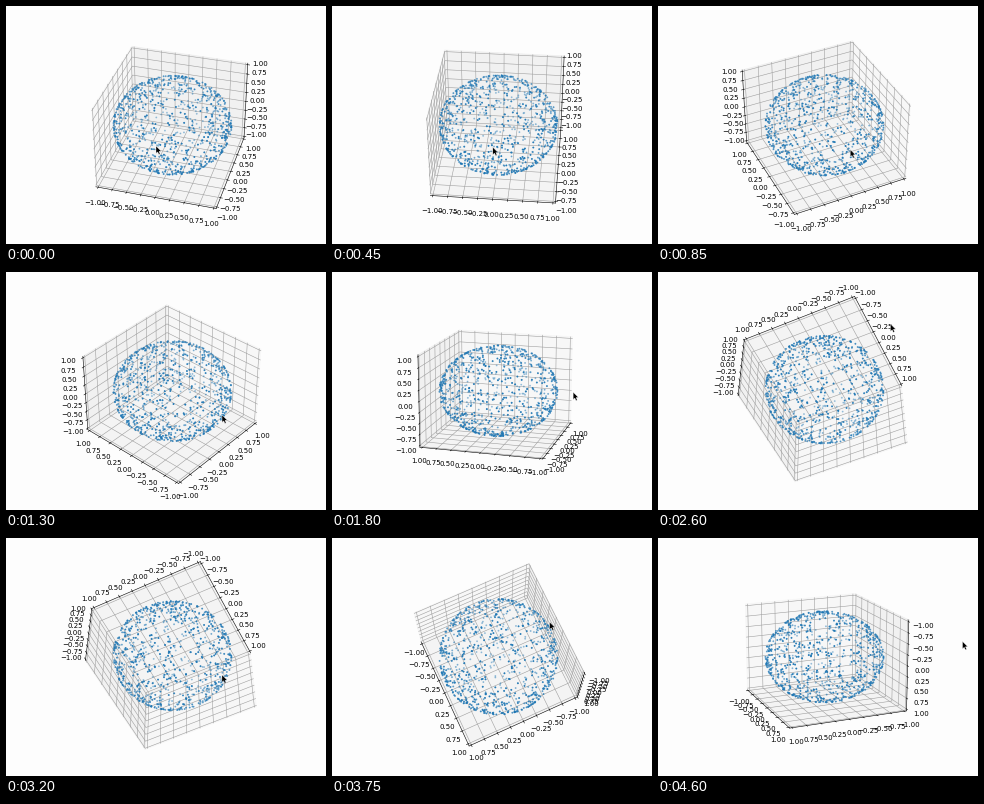
Animation of 320 by 238 pixels, one loop 4750 ms. Source, as a matplotlib script:

```python
import numpy as np
import matplotlib.pyplot as plt
from matplotlib.animation import FuncAnimation
from matplotlib.patches import Polygon

W, H, DPI = 320, 238, 50
FRAMES, STEP = 95, 50
POINTS = 900
MARGIN = 25 / 24            # panes reach a little past the data
PX_PER_DEG = 0.77 * H / 180  # dragging across the axes turns the view by 180 degrees
PRESS = 150, 140            # where the mouse is pressed, from the top left

# Two drags: time (ms), azimuth, elevation
VIEW = [(0, -74, 34.5), (550, -87, 36), (850, -115.5, 38), (1650, -157, 37),
        (1800, -163.5, 15), (2600, -155, -52), (2750, -153.5, -55),
        (3200, -153.5, -55), (4350, -157, -163.5)]
# Free mouse moves between and after the drags: time (ms), dx, dy
FREE = [(2750, 0, 0), (3200, -15, 88), (4400, -15, 88), (4500, 55, 185),
        (4600, 70, 165)]
ARROW = np.array([(0, 0), (0, 7.4), (1.7, 5.9), (2.9, 8.5), (4.1, 7.9),
                  (3, 5.4), (5.2, 5.2)])


def track(keys, t):
    times, *values = zip(*keys)
    return [np.interp(t, times, v) for v in values]


def sphere(n):
    rng = np.random.default_rng(4)
    p = rng.normal(size=(3, n))
    return p / np.linalg.norm(p, axis=0)


def pointer_tip(t, azim, elev):
    dx, dy = track(FREE, t)
    x = PRESS[0] - (azim - VIEW[0][1]) * PX_PER_DEG + dx
    y = PRESS[1] + (elev - VIEW[0][2]) * PX_PER_DEG + dy
    return x, y


plt.rcParams["grid.color"] = "0.62"
fig = plt.figure(figsize=(W / DPI, H / DPI), dpi=DPI, facecolor="#fdfdfd")
fig.subplots_adjust(bottom=0.107, top=0.877)
ax = fig.add_subplot(projection="3d", facecolor="#fdfdfd")
ax.scatter(*sphere(POINTS), s=3)
ax.set_box_aspect((4, 4, 3), zoom=MARGIN)
for axis in "xyz":
    ax.set(**{axis + "ticks": np.linspace(-1, 1, 9),
              axis + "lim": (-MARGIN, MARGIN)})
pointer = Polygon(ARROW, fc="black", ec="white", lw=0.5, transform=None, zorder=10)
fig.add_artist(pointer)


def update(i):
    t = i * STEP
    azim, elev = track(VIEW, t)
    ax.view_init(elev=elev, azim=azim)
    x, y = pointer_tip(t, azim, elev)
    pointer.set_xy(np.column_stack((x + ARROW[:, 0], H - y - ARROW[:, 1])))
    return ()


anim = FuncAnimation(fig, update, frames=FRAMES, interval=STEP,
                     repeat=True, repeat_delay=0, blit=False)
plt.show()
```
